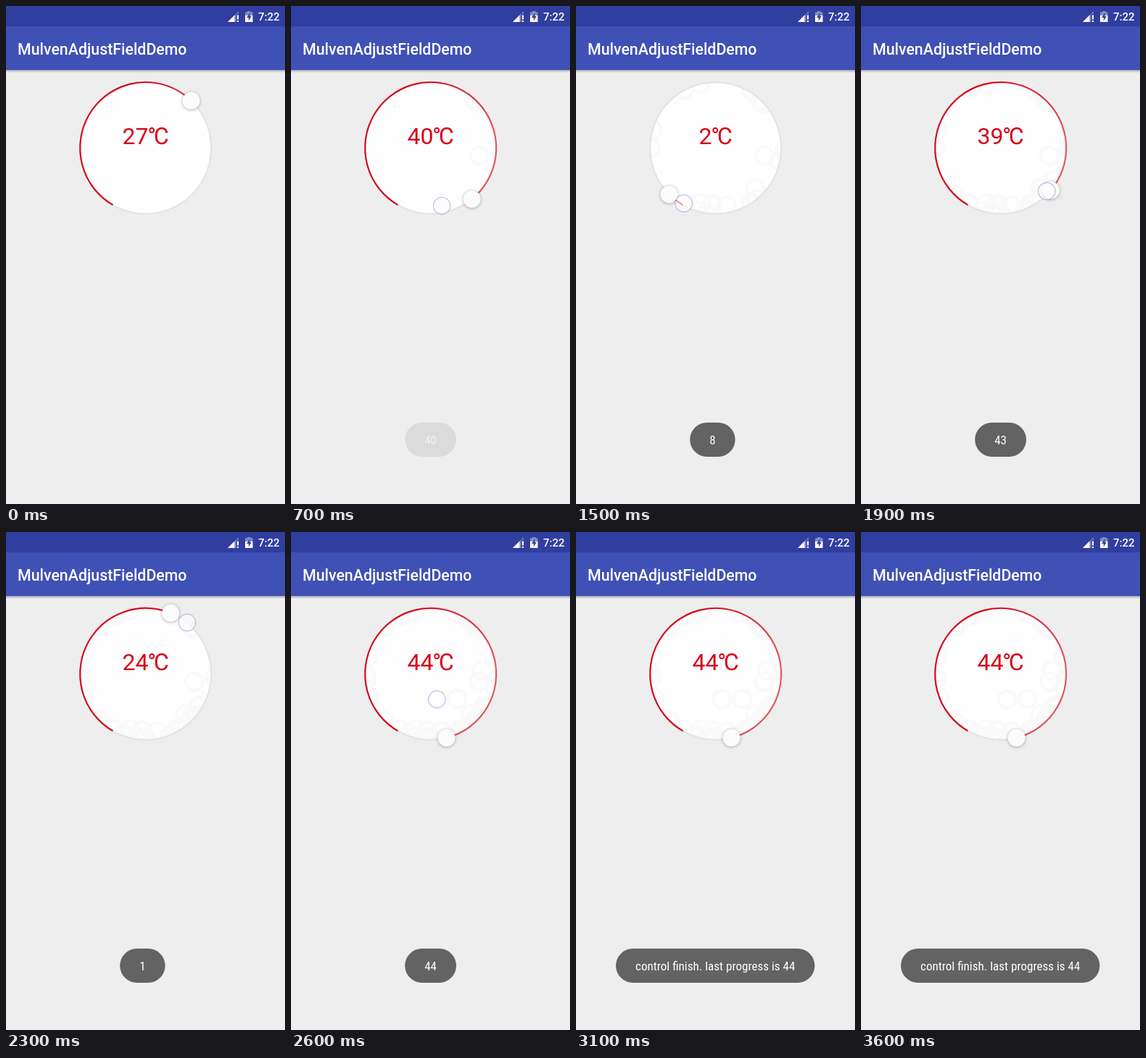
Recreate the animation shown at these times as an HTML page with a canvas. Size 385 by 685 pixels, loop 3700 ms.

```html
<!DOCTYPE html>
<html lang="en">
<head>
<meta charset="utf-8">
<title>Temperature dial</title>
<style>
  html, body { margin: 0; width: 100%; height: 100%; overflow: hidden; background: #eee; }
  canvas, svg { position: absolute; left: 0; top: 0; width: 385px; height: 685px; display: block; }
  text { font-family: Roboto, "Noto Sans CJK SC", "Noto Sans CJK JP", sans-serif; white-space: pre; }
  .bar { fill: #fff; font-weight: 500; }
  #reading { fill: #d6041a; font-size: 32px; text-anchor: middle; }
  #label { fill: #fff; font-family: "Roboto Condensed", Roboto, sans-serif; font-stretch: 75%; font-size: 17.07px; }
</style>
</head>
<body>
<canvas id="dial" width="385" height="685"></canvas>
<svg viewBox="0 0 385 685">
  <defs>
    <linearGradient id="shade" x2="0" y2="1">
      <stop offset="0" stop-color="#000" stop-opacity=".28"/>
      <stop offset="1" stop-color="#000" stop-opacity="0"/>
    </linearGradient>
  </defs>
  <rect y="88" width="385" height="4" fill="url(#shade)"/>
  <rect width="385" height="28" fill="#303f9f"/>
  <rect y="28" width="385" height="60" fill="#3f51b5"/>
  <text class="bar" x="16" y="66.8" font-size="21.33">MulvenAdjustFieldDemo</text>
  <text class="bar" x="348" y="20" font-size="15">7:22</text>

  <!-- signal -->
  <path d="M306 22L321 7V11H318V22Z" fill="#fff" opacity=".3"/>
  <path d="M306 22L315.5 12.5V22Z" fill="#fff"/>
  <path d="M319 12.5h2v6h-2zM319 20h2v2h-2z" fill="#fff"/>
  <!-- battery -->
  <path d="M330 8.5H333V7H337.5V8.5H340.5V13H330Z" fill="#fff" opacity=".4"/>
  <path d="M330 13H340.5V22H330Z" fill="#fff"/>
  <path d="M336.5 9.5L332 16H334.8V20.5L338.8 14H336.5Z" fill="#303f9f"/>

  <text id="reading" x="192.5" y="189.5"></text>
  <g id="toast">
    <rect id="pill" y="573" height="47" rx="23.5" fill="#636363"/>
    <text id="label" x="27" y="602.8"></text>
  </g>
</svg>
<script>
const LOOP = 3700, STEP = 100;
const PRESS = 500, FIRST_TOAST = 700, STOP = 2600, LIFT = 2900;
const CX = 192.7, CY = 195.3, R = 90.5;
const ORIGIN = 120, UNIT = 7.2;   // degrees: start of the scale, one unit of it
const LAG = 25;                   // ms by which the knob trails the finger
const MESSAGE = 'control finish. last progress is 44';

// Finger path around the dial: time, angle, radius
const path = [
  [575, -46, 90], [600, 9, 68], [675, 51, 78], [700, 79, 81], [850, 118, 78],
  [1050, 21, 78], [1100, 2.4, 95], [1500, -240, 88], [1800, -329, 86],
  [1900, -317, 87], [2300, -51, 91], [2570, 76, 36]
];
// Moments at which the toast picks up the dial's value
const refresh = [700, 900, 1100, 1250, 1430, 1700, 2050, 2400, 2600];

const $ = id => document.getElementById(id);
const ctx = $('dial').getContext('2d');
const reading = $('reading'), toast = $('toast'), pill = $('pill'), label = $('label');
const rad = deg => deg * Math.PI / 180;
const polar = (deg, r) => [CX + r * Math.cos(rad(deg)), CY + r * Math.sin(rad(deg))];

function fingerAt(t) {
  const next = path.findIndex(key => key[0] > t);
  if (next === 0) return path[0].slice(1);
  if (next < 0) return path[path.length - 1].slice(1);
  const [t0, deg0, r0] = path[next - 1], [t1, deg1, r1] = path[next];
  const f = (t - t0) / (t1 - t0);
  return [deg0 + (deg1 - deg0) * f, r0 + (r1 - r0) * f];
}

const knobAngle = t => fingerAt(t - LAG)[0];
const sweepAt = t => ((knobAngle(t) - ORIGIN) % 360 + 360) % 360;
const valueAt = t => Math.round(sweepAt(t) / UNIT);
const fingerSpot = t => polar(...fingerAt(t));
const knobSpot = t => polar(knobAngle(t), R);

// Regular width needs a smaller size where no condensed face exists
label.textContent = MESSAGE;
if (label.getComputedTextLength() > 232) label.style.fontSize = '15.25px';

const red = ctx.createConicGradient(rad(ORIGIN), CX, CY);
red.addColorStop(0, '#d40318');
red.addColorStop(0.4, '#d8081e');
red.addColorStop(0.65, '#e05a64');
red.addColorStop(1, '#da4450');

function circle(x, y, r) {
  ctx.beginPath();
  ctx.arc(x, y, r, 0, Math.PI * 2);
}

function fill(color) {
  ctx.fillStyle = color;
  ctx.fill();
}

function stroke(color, width) {
  ctx.strokeStyle = color;
  ctx.lineWidth = width;
  ctx.stroke();
}

// Faint rings stay behind wherever finger and knob have been
function drawTrail(t) {
  ctx.save();
  circle(CX, CY, R);
  ctx.clip();
  for (let past = PRESS; past < Math.min(t, STOP + STEP); past += STEP) {
    for (const spot of [fingerSpot(past), knobSpot(past)]) {
      circle(...spot, 12);
      stroke('#f9f9f9', 4);
    }
  }
  ctx.restore();
}

function drawKnob(t) {
  ctx.save();
  ctx.shadowColor = 'rgba(0,0,0,.32)';
  ctx.shadowBlur = 4;
  ctx.shadowOffsetY = 0.7;
  circle(...knobSpot(t), 12);
  fill('#fbfbfb');
  ctx.restore();
}

function drawFinger(t) {
  circle(...fingerSpot(t), 11.7);
  fill('rgba(255,255,255,.6)');
  stroke('rgba(150,150,215,.55)', 1.4);
}

function drawDial(t) {
  ctx.clearRect(0, 0, 385, 685);
  circle(CX, CY, R);
  fill('#fefefe');
  drawTrail(t);
  circle(CX, CY, R);
  stroke('#e4e4e4', 2.2);
  ctx.beginPath();
  ctx.arc(CX, CY, R, rad(ORIGIN), rad(ORIGIN + sweepAt(t)));
  stroke(red, 2.1);
  drawKnob(t);
  if (t >= PRESS && t < LIFT) drawFinger(t);
  reading.textContent = valueAt(t) + '℃';
}

function drawToast(t) {
  const lifted = t >= LIFT;
  // The wide toast slides to the centre, slowing down
  const rest = Math.max(0, 1 - (t - LIFT) / (2 * STEP));
  const left = lifted ? 55 + 24 * rest * rest : 157.2;
  const alpha = Math.min(1, Math.max(0, 0.13 + (t - FIRST_TOAST) / 240));
  const picked = refresh.filter(moment => moment <= t).pop();
  label.textContent = lifted ? MESSAGE : valueAt(picked || 0);
  pill.setAttribute('width', label.getComputedTextLength() + 54);
  toast.setAttribute('transform', `translate(${left} 0)`);
  toast.setAttribute('opacity', t < FIRST_TOAST ? 0 : alpha);
}

const born = performance.now();
let shown = -1;
function tick() {
  const ms = (performance.now() - born) % LOOP;
  const t = Math.floor(ms / STEP) * STEP;
  if (t !== shown) {
    shown = t;
    drawDial(t);
    drawToast(t);
  }
  requestAnimationFrame(tick);
}
tick();
</script>
</body>
</html>
```
